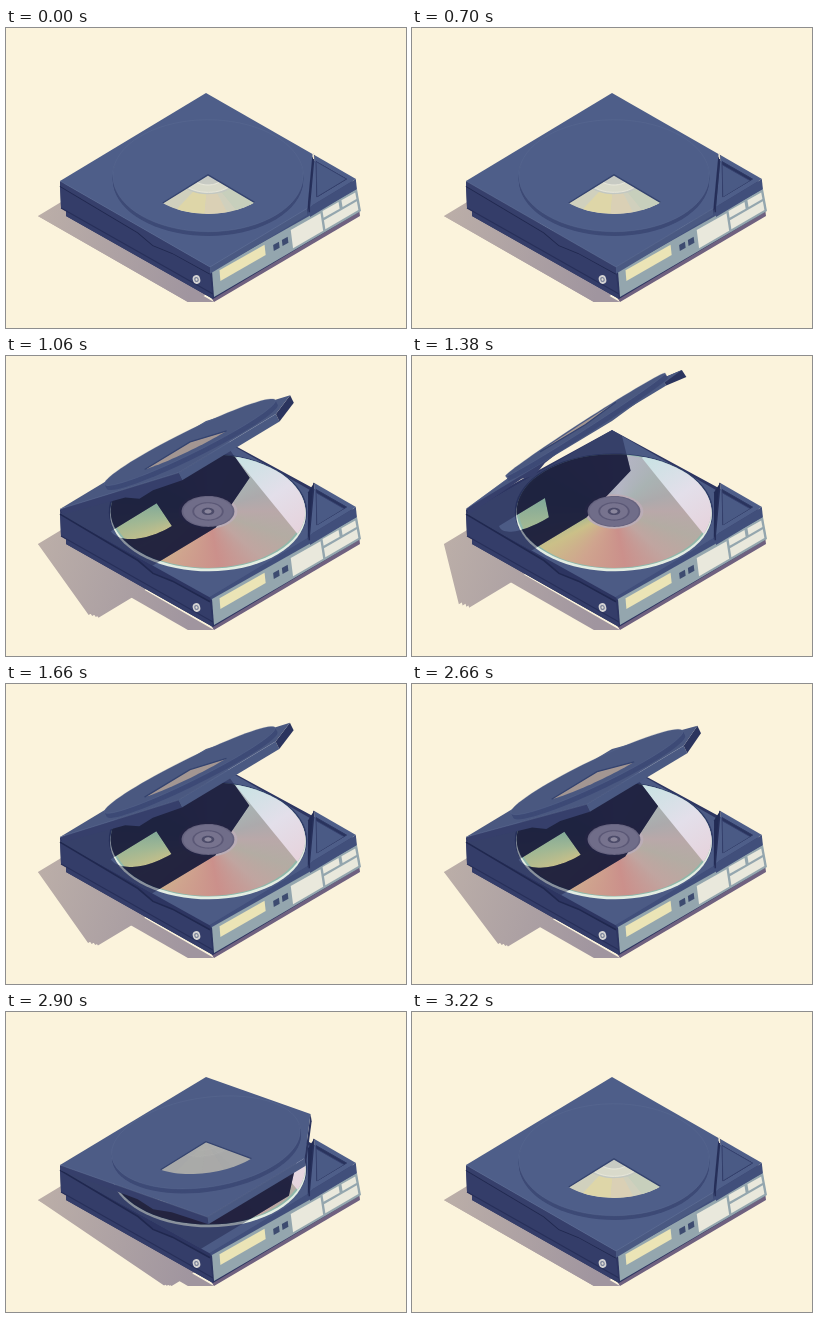
Recreate the animation shown at these times as an HTML page with a canvas. Size 400 by 300 pixels, loop 3.82 s.

```html
<!DOCTYPE html>
<html lang="en">
<head>
<meta charset="utf-8">
<title>Disc player</title>
<style>
html, body { margin: 0; width: 100%; height: 100%; overflow: hidden; background: #fbf3dc; }
canvas { display: block; }
</style>
</head>
<body>
<canvas id="stage" width="400" height="300"></canvas>
<script>
const ctx = document.getElementById('stage').getContext('2d');
const LOOP = 3820, UP = 170, GROUND = 34, OPEN = 38, PEAK = 50;

const ramp = (t, from, to) => Math.min(1, Math.max(0, (t - from) / (to - from)));
const smooth = u => u * u * (3 - 2 * u);
const cubic = u => u < .5 ? 4 * u ** 3 : 1 - 4 * (1 - u) ** 3;

// Lid angle in degrees
function lidAngle(t) {
  if (t < 1320) return PEAK * cubic(ramp(t, 690, 1300));
  if (t < 2660) return PEAK + (OPEN - PEAK) * smooth(ramp(t, 1320, 1660));
  return OPEN * (1 - smooth(ramp(t, 2610, 3060)));
}
const pressDepth = t => smooth(ramp(t, 300, 600)) - smooth(ramp(t, 2960, 3220));

// Case coordinates to the screen: a runs to the front, b to the back right,
// z is height; the angle turns the point about the back left edge.
function project(a, b, z = 0, angle = 0) {
  const s = Math.sin(angle), c = Math.cos(angle);
  const along = a * c - z * s, height = UP * (a * s + z * c);
  return [54 + 150 * along + 146 * b, 153 + 86 * along - 88 * b - height, height];
}
function castShadow([x, y, height], drop) {
  const fall = height + drop;
  return [x - .65 * fall, y + height + .03 * fall + drop];
}

function trace(points) {
  points.forEach(([x, y], i) => i ? ctx.lineTo(x, y) : ctx.moveTo(x, y));
  ctx.closePath();
}
function poly(points, fill, stroke, width = 1) {
  ctx.beginPath();
  trace(points);
  if (fill) { ctx.fillStyle = fill; ctx.fill(); }
  if (stroke) { ctx.strokeStyle = stroke; ctx.lineWidth = width; ctx.stroke(); }
}
function line(points, color, width) {
  ctx.beginPath();
  points.forEach(([x, y]) => ctx.lineTo(x, y));
  ctx.strokeStyle = color;
  ctx.lineWidth = width;
  ctx.stroke();
}
function clipped(points, paint) {
  ctx.save();
  ctx.beginPath();
  trace(points);
  ctx.clip();
  paint();
  ctx.restore();
}
// Plan points of an arc around the middle of the case
function arc(r, from = 0, to = 2 * Math.PI, steps = 72) {
  return Array.from({ length: steps + 1 }, (_, i) => {
    const v = from + (to - from) * i / steps;
    return [.5 + r * Math.cos(v), .5 + r * Math.sin(v)];
  });
}
const place = (points, z, angle) => points.map(([a, b]) => project(a, b, z, angle));

const lidPlan = [[0, 0], [0, 1], [.71, 1], [1, .667], [1, 0]];
const windowPlan = [[.495, .505], ...arc(.31, -Math.PI / 2, 0, 24)];
const seam = [[1, -.04], [.75, -.045], [.62, -.065], [.52, -.04], [0, -.03]];
const deck = [[0, 0, -.03], [0, 1, -.055], [.73, 1, -.055], [1, .7, -.015], [1, 0, -.015]]
  .map(p => project(...p));
const discFace = place(arc(.465), -.02);

// The lid is thick, so its shadow is the union of several layers
function traceLidShadow(angle, drop) {
  ctx.beginPath();
  for (const z of [0, -.02, -.04, -.055])
    trace(place(lidPlan, z, angle).map(p => castShadow(p, drop)));
}

function drawGroundShadow(angle) {
  const shade = ctx.createLinearGradient(30, 200, 190, 250);
  shade.addColorStop(0, '#bbaea8');
  shade.addColorStop(1, '#a0959f');
  const left = project(0, 0), front = project(1, 0);
  poly([castShadow(left, GROUND), castShadow(front, GROUND), [208, 274], [59, 188]], shade);
  traceLidShadow(angle, GROUND);
  ctx.fill();
}

function drawDisc() {
  const [cx, cy] = project(.5, .5, -.02);
  poly(place(arc(.474), -.022), '#303d69');
  poly(place(arc(.468), -.034), '#e3ede2');
  poly(discFace, '#8fb8aa');
  ctx.save();
  ctx.translate(cx, cy);
  ctx.scale(1, .595);
  const sheen = ctx.createConicGradient(0, 0, 0);
  ['#b9a8a9', '#b3aca3', '#c0a5a0', '#cb908b', '#cfa48e', '#cbc088', '#9fb794',
    '#82a998', '#86ae9f', '#a3a9b4', '#b4b5c4', '#a9b3b3', '#acaaac', '#b9a8a9']
    .forEach((color, i, all) => sheen.addColorStop(i / (all.length - 1), color));
  ctx.fillStyle = sheen;
  ctx.beginPath();
  ctx.arc(0, 0, 95, 0, 7);
  ctx.fill();
  ctx.restore();
  clipped(discFace, () => {
    const glare = ctx.createLinearGradient(245, 100, 295, 175);
    glare.addColorStop(0, '#cbe2e4');
    glare.addColorStop(.5, '#e3dfea');
    glare.addColorStop(1, '#e6d3dc');
    poly([[230, 102], [246, 122], [294, 181], [312, 150], [250, 80]], glare);
  });
  poly(place(arc(.14), -.02), '#bbadb6');
}

function drawLidShadow(angle) {
  const hole = place(windowPlan, 0, angle).map(p => castShadow(p, 3.4));
  const fillWithin = (area, color) => clipped(area, () => {
    ctx.beginPath();
    ctx.rect(0, 0, 400, 300);
    trace(hole);
    ctx.clip('evenodd');
    traceLidShadow(angle, 3.4);
    ctx.fillStyle = color;
    ctx.fill();
  });
  fillWithin(deck, 'rgba(28,33,72,.45)');
  fillWithin(discFace, 'rgba(23,26,58,.88)');
}

function drawHub() {
  [[.126, '#66637f'], [.118, '#706d89'], [.075, '#5b5876'], [.066, '#77738e'],
    [.03, '#4c4b69'], [.017, '#8a869c']]
    .forEach(([r, color]) => poly(place(arc(r), -.02), color));
}

// A patch on the front panel; u runs along it and v down it, both 0 to 1
function onPanel(u0, v0, u1, v1, fill) {
  const at = (u, v) => [206 + 145 * u + v * (2 + 2 * u), 243 - 82 * u + v * (26 - 4 * u)];
  poly([at(u0, v0), at(u1, v0), at(u1, v1), at(u0, v1)], fill);
}

function drawCase(angle) {
  const left = seam.map(([a, z]) => project(a, 0, z));
  poly([[200, 262], [208, 274], [354, 188], [353, 180]], '#6f6180');
  poly([[54, 154], [55, 180], [60, 183], [60, 188], [207, 271], [353, 184], [349, 155], [200, 74]], '#2d3561');
  poly(deck, '#4c5b85');
  if (angle > 0) {
    drawDisc();
    drawLidShadow(angle);
    drawHub();
  }
  poly([...left, [55, 180], [60, 183], [60, 188], [207, 271]], '#343d69');
  line(left, '#20284f', 1.6);
  line([[55, 180], [207, 266]], '#272f59', 1.2);
  poly([project(1, 0, -.01), project(1, 1, -.01), [351, 162], [205, 244]], '#414f7b');
  // Inner wall of the corner that stays behind when the lid lifts
  poly([project(.72, 1), project(1, .68), project(1, .67, -.02), project(.7, .98, -.055)], '#222b54');
}

function drawPanel() {
  onPanel(0, 0, 1, 1, '#94a6ae');
  onPanel(.05, .13, .36, .55, '#ebe4b6');
  onPanel(.415, .33, .455, .58, '#3d4b70');
  onPanel(.475, .33, .515, .58, '#3d4b70');
  onPanel(.54, .14, .745, .9, '#e9e8dc');
  onPanel(.76, .1, .87, .4, '#e9e8dc');
  onPanel(.89, .1, .985, .4, '#e9e8dc');
  onPanel(.76, .5, .985, .9, '#e9e8dc');
  [[4.4, '#d4d3d3'], [2.6, '#7d859c'], [1.2, '#e2dfd7']].forEach(([r, color]) => {
    ctx.beginPath();
    ctx.ellipse(190.5, 251.5, r * .85, r, -.3, 0, 7);
    ctx.fillStyle = color;
    ctx.fill();
  });
}

function drawWindow(angle, z) {
  const lift = Math.min(1, angle / .2), shape = place(windowPlan, z, angle);
  poly(shape, angle > .4 ? '#a39692' : '#a5a7a6');
  clipped(shape, () => {
    ctx.globalAlpha = 1 - lift;
    poly(shape, '#d0d0bd');
    [[-1.3, -.85, '#ded6a8'], [-.85, -.5, '#dad0b5'], [-.35, 0, '#c7cfbc']].forEach(([from, to, color]) =>
      poly([...place(arc(.31, from, to, 12), z, angle), project(.5, .5, z, angle)], color));
    poly(place(arc(.15), z, angle), '#c3c8c1');
    poly(place(arc(.135), z, angle), '#d9dacb', '#e8e7da');
    poly(place(arc(.075), z, angle), '#c7cac3', '#e9e8dc');
  });
  line([shape[1], shape[0], shape[shape.length - 1]], '#34436f', 1.3);
}

function drawLid(angle) {
  const at = (a, b, z) => project(a, b, z, angle), rise = .025;
  const shade = Math.min(1, angle / .65);
  const top = `rgb(${78 - 4 * shade},${94 - 6 * shade},${137 - 9 * shade})`;
  poly([at(0, 0, 0), at(1, 0, 0), ...seam.map(([a, z]) => at(a, 0, z))], '#363f6b');
  poly([at(1, 0, 0), at(1, .667, 0), at(1, .667, -.04), at(1, 0, -.04)], '#4a5982');
  poly([at(1, .667, 0), at(.71, 1, 0), at(.71, 1, -.04), at(1, .667, -.04)], '#2b345e');
  poly(place(lidPlan, 0, angle), top);
  line([at(0, 0, 0), at(1, 0, 0), at(1, .667, 0)], 'rgba(112,128,166,.45)', .8);
  for (let z = 0; z < rise; z += .005) poly(place(arc(.455), z, angle), '#3d4a76');
  poly(place(arc(.455), rise, angle), top, 'rgba(103,119,158,.35)', .7);
  drawWindow(angle, rise);
}

function drawCorner(depth, angle) {
  const key = [[.765, .968], [.968, .968], [.968, .765]];
  poly([project(1, .685), project(1, 1), project(1, 1, -.06), project(1, .685, -.06)], '#414f7b');
  poly(place([[.725, 1], [1, 1], [1, .685]], 0), '#4e5e89');
  line([project(.72, 1), project(1, .68), project(1, .68, -.03)], '#27305a', 1.5);
  const hole = place(key, 0);
  poly(hole, '#29335d', '#2d3762', 1);
  clipped(hole, () => poly(place(key, -.018 * depth), '#4a5a85', '#36426f', .8));
  if (angle < .03) line([[307.5, 125], [307.5, 131]], '#e9e2d1', 1);
}

function draw(t) {
  const angle = lidAngle(t) * Math.PI / 180;
  ctx.fillStyle = '#fbf3dc';
  ctx.fillRect(0, 0, 400, 300);
  drawGroundShadow(angle);
  drawCase(angle);
  drawPanel();
  drawLid(angle);
  drawCorner(pressDepth(t), angle);
}

// The motion advances in steps of 40 ms
function tick() {
  const t = performance.now() % LOOP;
  draw(Math.max(0, Math.floor((t - 20) / 40) * 40 + 20));
  requestAnimationFrame(tick);
}
tick();
</script>
</body>
</html>
```
